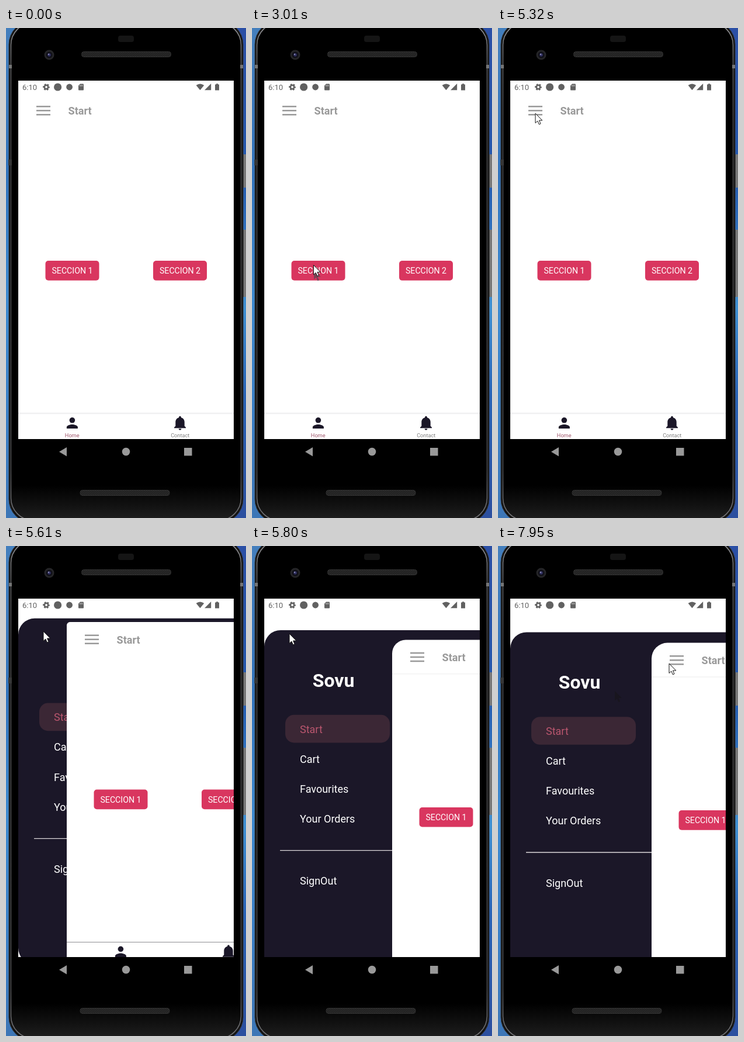
An HTML page for the animation above (8 s loop, 411 px wide and 838 px high).

```html
<!DOCTYPE html>
<html lang="en">
<head>
<meta charset="utf-8">
<title>Drawer menu</title>
<style>
  html, body { margin: 0; width: 100%; height: 100%; overflow: hidden; background: #2f66b2; }
  svg { display: block; width: 411px; height: 838px; }
  text { font-family: Roboto, Arial, sans-serif; }
  .bold { font-weight: 700; }
  .mid { text-anchor: middle; }
  .btn { font-size: 14.2px; fill: #fff; }
  .tab { font-size: 9.2px; }
  .item { font-size: 18px; fill: #fff; }
</style>
</head>
<body>
<svg viewBox="0 0 411 838">
  <defs>
    <linearGradient id="skyL" x2="0" y2="1">
      <stop offset="0" stop-color="#447fbd"/><stop offset=".3" stop-color="#3274bd"/>
      <stop offset=".55" stop-color="#3d8ad0"/><stop offset=".8" stop-color="#3a7fc6"/>
      <stop offset="1" stop-color="#3d76b6"/>
    </linearGradient>
    <linearGradient id="skyR" x2="0" y2="1">
      <stop offset="0" stop-color="#2b4fa5"/><stop offset=".3" stop-color="#2459ae"/>
      <stop offset=".57" stop-color="#3f90d2"/><stop offset=".75" stop-color="#2963b6"/>
      <stop offset="1" stop-color="#2c4f9f"/>
    </linearGradient>
    <linearGradient id="rim" x2="0" y2="1">
      <stop offset="0" stop-color="#98989b"/><stop offset=".08" stop-color="#5a5a5c"/>
      <stop offset=".2" stop-color="#444446"/><stop offset=".9" stop-color="#48484a"/>
      <stop offset="1" stop-color="#77777a"/>
    </linearGradient>
    <linearGradient id="panel" x2="0" y2="1">
      <stop offset=".93" stop-color="#000"/><stop offset="1" stop-color="#1f1f1f"/>
    </linearGradient>
    <linearGradient id="key">
      <stop offset="0" stop-color="#3a3a3a"/><stop offset=".6" stop-color="#8a8a8a"/>
      <stop offset="1" stop-color="#4a4a4a"/>
    </linearGradient>
    <pattern id="mesh" width="3" height="3" patternUnits="userSpaceOnUse">
      <rect width="3" height="3" fill="#1b1b1b"/>
      <path d="M0 3L3 0" stroke="#3d3d3d" stroke-width=".9"/>
    </pattern>
    <clipPath id="screen"><rect x="21" y="90" width="369" height="613"/></clipPath>
    <path id="arrow" d="M0 0V16.5L3.8 13L6.4 18.9L9 17.7L6.5 12H11.8Z"/>
    <path id="bars" d="M52 134.2H76M52 141.2H76M52 148.2H76" stroke="#999" stroke-width="2.6"/>
  </defs>

  <!-- desktop and phone body -->
  <rect width="206" height="838" fill="url(#skyL)"/>
  <rect x="205" width="206" height="838" fill="url(#skyR)"/>
  <rect x="405" y="216" width="7" height="57" rx="2" fill="url(#key)"/>
  <rect x="405" y="345" width="7" height="115" rx="2" fill="url(#key)"/>
  <rect x="5" y="-12" width="401" height="858" rx="40" fill="#141414" stroke="#333"/>
  <rect x="8.5" y="-9" width="394" height="851" rx="38" fill="url(#panel)" stroke="url(#rim)" stroke-width="1.6"/>
  <path d="M5 63H10V69H5ZM401 63H406V69H401Z" fill="#767676"/>
  <rect x="4" y="225" width="6" height="10" fill="#363636"/>
  <rect x="192" y="13" width="27" height="11" rx="4" fill="#151515"/>
  <rect x="129.5" y="40.5" width="153" height="9" rx="4" fill="url(#mesh)" stroke="#333"/>
  <rect x="127" y="790.5" width="153" height="9" rx="4" fill="url(#mesh)" stroke="#333"/>
  <circle cx="74" cy="46" r="8.5" fill="#252527"/>
  <circle cx="74" cy="46" r="5.5" fill="#101018"/>
  <circle cx="74" cy="46" r="2.8" fill="#303060"/>
  <circle cx="73" cy="45" r="1.2" fill="#8a8ab4"/>
  <g fill="#999">
    <path d="M91 724.8L104 717V732.6Z"/>
    <circle cx="205.5" cy="724.6" r="6.8"/>
    <rect x="305" y="718" width="13.5" height="13.5"/>
  </g>

  <g clip-path="url(#screen)">
    <rect x="21" y="90" width="369" height="613" fill="#fff"/>

    <g id="drawer">
      <path d="M391 111.4H49A28 28 0 0 0 21 139.4V675A28 28 0 0 0 49 703H391Z" fill="#1b1728"/>
      <text class="bold mid" x="139.6" y="208" font-size="32" fill="#fff">Sovu</text>
      <rect x="57" y="256.2" width="179" height="47.6" rx="15" fill="#3b2735"/>
      <g id="items"></g>
      <path d="M48 488H300" stroke="#dcd8da" stroke-width="1.4"/>
    </g>

    <g id="card">
      <rect id="sheet" x="21" y="111.6" width="400" height="640" fill="#fff"/>
      <use href="#bars"/>
      <text class="bold" x="106.6" y="148" font-size="18" fill="#999">Start</text>
      <path id="rule" d="M21 170H390" stroke="#ebebeb"/>
      <g id="buttons"></g>
      <path id="tabLine" d="M21 659H390"/>
      <g fill="#1b1728">
        <circle cx="113.4" cy="670.8" r="4.8"/>
        <path d="M103.9 685V682.6C103.9 679.5 110.3 677.9 113.4 677.9S122.9 679.5 122.9 682.6V685Z"/>
        <path d="M288 684.3V683L290.3 680.8V674C290.3 670 292.6 667.2 296.1 666.3V665.6A1.9 1.9 0 0 1 299.9 665.6V666.3C303.4 667.2 305.7 670 305.7 674V680.8L308 683V684.3ZM295.6 685.3H300.4A2.4 2.4 0 0 1 295.6 685.3Z"/>
      </g>
      <text class="tab mid" x="113.2" y="700.4" fill="#a0566c">Home</text>
      <text class="tab mid" x="298.2" y="700.4" fill="#808080">Contact</text>
    </g>

    <!-- status bar -->
    <g fill="#616161">
      <text x="28" y="105.6" font-size="13">6:10</text>
      <circle cx="69" cy="101" r="3.2" fill="none" stroke="#616161" stroke-width="2.6"/>
      <circle cx="69" cy="101" r="5" fill="none" stroke="#616161" stroke-width="1.8" stroke-dasharray="2.9 2.336" stroke-dashoffset="1.45"/>
      <circle cx="88.6" cy="101" r="6.6"/>
      <circle cx="108.6" cy="101" r="5.4"/>
      <path d="M127 95.5H132Q133 95.5 133 96.5V105.5Q133 106.5 132 106.5H125Q124 106.5 124 105.5V98.5Z"/>
      <path d="M126.7 97.5V99.7M128.8 97.5V99.7M130.9 97.5V99.7" stroke="#fff" stroke-width=".8"/>
      <path d="M325.6 98Q332.3 92.8 339.2 98L332.4 106.3Z"/>
      <path d="M340 106.2L351.2 95V106.2Z"/>
      <path d="M358 96.5H360V95.2H363V96.5H365V106.4H358Z"/>
    </g>
  </g>

  <use id="smudge1" href="#arrow" x="106" y="413.5" fill="#4c4a50" opacity=".68"/>
  <use id="smudge2" href="#arrow" x="200" y="248" fill="#15130f" opacity=".4"/>
  <use id="cursor" href="#arrow" fill="#fff" stroke="#111" stroke-width="1" stroke-linejoin="round"/>
</svg>

<script>
const LOOP = 8000;
const $ = id => document.getElementById(id);

const menu = [["Start", 287], ["Cart", 338], ["Favourites", 389.2], ["Your Orders", 440.2], ["SignOut", 546.5]];
$("items").innerHTML = menu.map(([name, y], i) =>
  `<text class="item" x="82" y="${y}"${i ? "" : ' style="fill:#b9566e"'}>${name}</text>`).join("");

$("buttons").innerHTML = [67.5, 252].map((x, i) =>
  `<rect x="${x}" y="398.1" width="92" height="33.6" rx="5" fill="#d9365f"/>
   <text class="btn mid" x="${x + 46}" y="420.2">SECCION ${i + 1}</text>`).join("");

const easeOut = u => 1 - (1 - u) ** 1.8;
const easeInOut = u => u * u * (3 - 2 * u);

// n points leading from a to b, bulging vertically by arc
const glide = (a, b, n, ease, arc = 0) => Array.from({ length: n }, (_, k) => {
  const u = ease((k + 1) / n);
  return [a[0] + (b[0] - a[0]) * u, a[1] + (b[1] - a[1]) * u + arc * 4 * u * (1 - u)];
});

// [first time, last time, one value per evenly spaced step]
const cursorMoves = [
  [520, 1290, glide([392, 896], [107, 414], 12, easeOut)],
  [1420, 1420, [[106.5, 413]]],
  [3010, 3650, glide([106.5, 413], [68, 143], 10, easeInOut)],
  [4110, 4860, [[72, 193], [88, 270], [110, 360], [126, 425], [129, 439],
                [120, 410], [104, 345], [82, 265], [60, 195], [63, 171]]],
  [4930, 5320, [[57, 150], [52, 138], [51, 132], [55, 137], [61, 143], [64, 146]]],
  [5540, 6330, [[64, 146], [64, 146], [64, 147], [64, 148], [64, 150],
                ...glide([64, 150], [103, 367.5], 8, easeInOut)]],
  [7530, 7950, glide([103, 367.5], [293, 201], 7, easeInOut, -33)]
];
const drawerMoves = [
  [5540, 6330, [.12, .343, .57, .765, .905, .955, .978, .989, .994, .997, .998, .999, .999]],
  [6470, 6470, [1]]
];

function valueAt(moves, t, start) {
  let value = start;
  for (const [from, to, steps] of moves) {
    if (t < from) break;
    const gap = (to - from) / (steps.length - 1) || 1;
    // a little slack absorbs the 10 ms rounding of step times
    const k = Math.min(steps.length - 1, Math.floor((t - from + 5) / gap));
    value = steps[k];
  }
  return value;
}

const show = (id, on) => $(id).setAttribute("visibility", on ? "visible" : "hidden");
const move = (id, x, y) => $(id).setAttribute("transform", `translate(${x} ${y})`);

function draw(t) {
  const p = valueAt(drawerMoves, t, 0);
  show("drawer", p > 0);
  move("drawer", 0, 36 * p);
  move("card", 242 * p, 54 * p);
  $("sheet").setAttribute("rx", 27 * p ** 1.5);
  $("rule").setAttribute("opacity", p > .5 ? p : 0);
  $("tabLine").setAttribute("stroke", p ? "#8f8f92" : "#f0f0f1");
  $("tabLine").setAttribute("stroke-width", p ? 1 : 2.4);

  const pos = valueAt(cursorMoves, t, null);
  show("cursor", pos);
  if (pos) move("cursor", pos[0], pos[1]);
  show("smudge1", t >= 3010 && t < 4400);
  show("smudge2", t >= 7810);
}

function tick() {
  draw(performance.now() % LOOP);
  requestAnimationFrame(tick);
}
tick();
</script>
</body>
</html>
```
